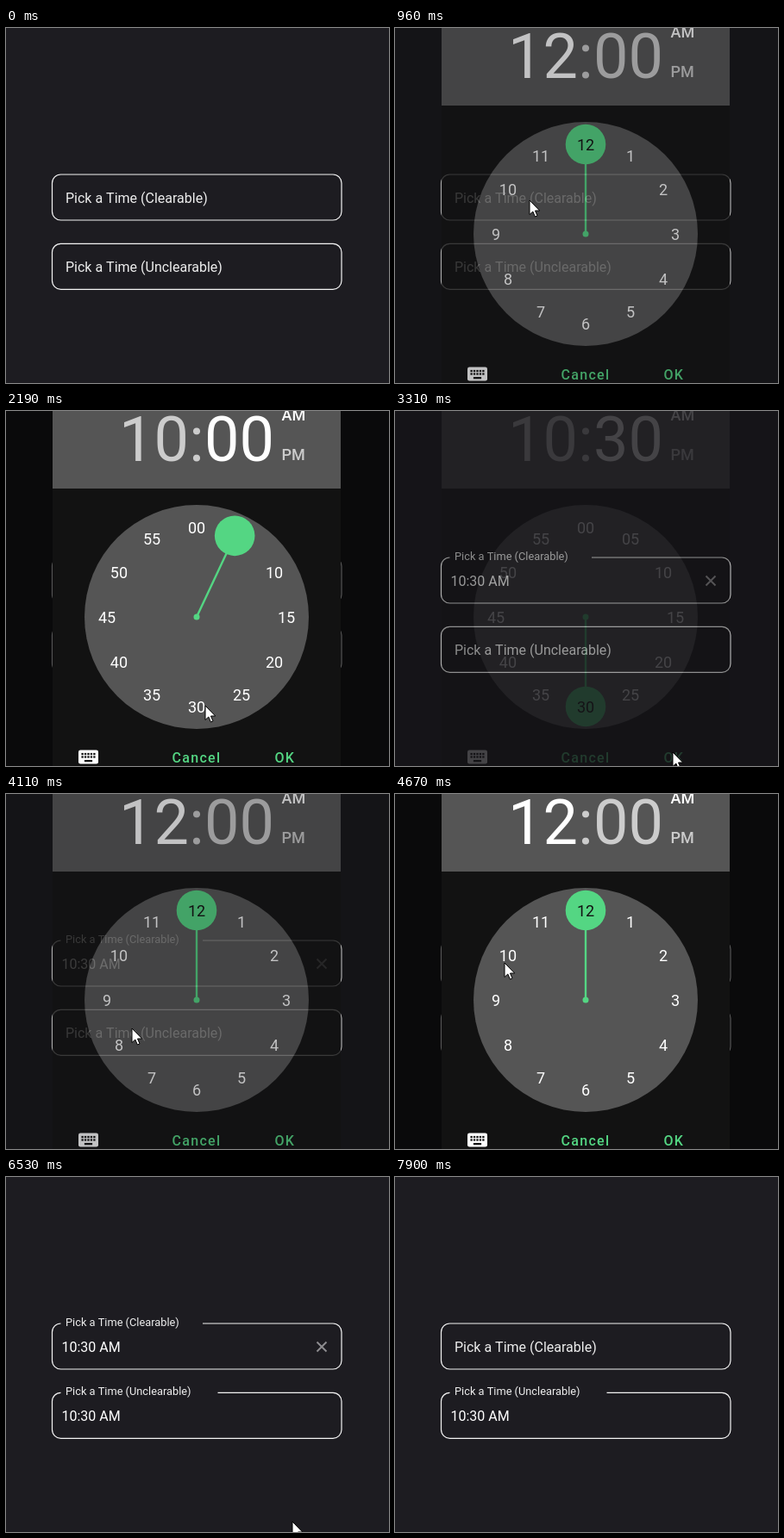
An HTML page with a canvas for the animation above (8430 ms loop, 444x412 px).

```html
<!DOCTYPE html>
<html lang="en">
<head>
<meta charset="utf-8">
<title>Time picker</title>
<style>
html, body { margin: 0; width: 100%; height: 100%; overflow: hidden; background: #1d1c21; }
canvas { display: block; }
</style>
</head>
<body>
<canvas id="stage" width="444" height="412"></canvas>
<script>
const LOOP = 8430, W = 444, H = 412;
const GREEN = '#54d683', GREY = '#555555', BODY = '#121212', DIM = '#cccccc';
const CX = 221, CY = 239, RING = 104;
const FONT = 'Roboto, "Open Sans", sans-serif';

const stage = document.getElementById('stage').getContext('2d');
const sheet = document.createElement('canvas');
sheet.width = W;
sheet.height = H;
const dlg = sheet.getContext('2d');

// Each opening of the dialog; "shift" maps it onto the first one's clock.
const runs = [
  { shift: 0, open: 960, close: 3240 },
  { shift: 3150, open: 4110, close: 6260 }
];
const HOUR_CLICK = 1640, TO_MINUTES = 1780, SWEEP = 500, MINUTE_CLICK = 2400;
const CLEAR = 7560;

// Pointer path: time, x, y
const path = [
  [70, 346, 361], [490, 145, 190], [630, 156, 200], [1300, 156, 200],
  [1540, 127, 196], [1820, 127, 196], [2150, 231, 342], [2500, 231, 342],
  [3010, 322, 396], [3420, 322, 396], [3910, 146, 272], [4290, 146, 272],
  [4660, 127, 196], [4970, 127, 196], [5300, 231, 342], [5600, 231, 342],
  [6050, 322, 396], [6400, 322, 396], [6530, 332, 400], [6740, 346, 330],
  [7230, 366, 198], [7560, 366, 198], [7890, 436, 414]
];

const smooth = p => p * p * (3 - 2 * p);

function text(c, str, x, y, size, color, opt = {}) {
  c.font = `${opt.weight || 400} ${size}px ${FONT}`;
  c.textAlign = opt.align || 'left';
  c.letterSpacing = (opt.spacing || 0) + 'px';
  c.fillStyle = color;
  c.fillText(str, x, y);
  c.letterSpacing = '0px';
}

function disc(c, x, y, r, color) {
  c.fillStyle = color;
  c.beginPath();
  c.arc(x, y, r, 0, Math.PI * 2);
  c.fill();
}

function field(y, label, notchEnd, filled, clearable) {
  const c = stage, l = 53.5, r = 389, b = y + 53, q = 10;
  c.strokeStyle = '#f4f4f4';
  c.lineWidth = 1.2;
  c.beginPath();
  c.moveTo(filled ? notchEnd : l + q, y);
  c.arcTo(r, y, r, b, q);
  c.arcTo(r, b, l, b, q);
  c.arcTo(l, b, l, y, q);
  c.arcTo(l, y, r, y, q);
  if (!filled) c.closePath();
  c.stroke();
  if (!filled) {
    text(c, label, 69, y + 33, 16, '#eeeeee');
    return;
  }
  text(c, label, 69, y + 3, 12.8, '#eeeeee');
  text(c, '10:30 AM', 64.5, y + 33, 16, '#ffffff');
  if (clearable) {
    c.strokeStyle = '#8e8d90';
    c.lineWidth = 1.9;
    c.beginPath();
    for (const s of [-1, 1]) {
      c.moveTo(366 - 5.5, y + 27 - 5.5 * s);
      c.lineTo(366 + 5.5, y + 27 + 5.5 * s);
    }
    c.stroke();
  }
}

function keyboard(c) {
  c.save();
  c.translate(81.7, 387.7);
  c.scale(1.15, 1.15);
  c.fillStyle = '#ffffff';
  c.beginPath();
  c.roundRect(2, 5, 20, 14, 2);
  c.fill();
  c.fillStyle = BODY;
  for (let i = 0; i < 5; i++)
    for (const y of [8, 11]) c.fillRect(5 + 3 * i, y, 2, 2);
  c.fillRect(8, 15, 8, 2);
  c.restore();
}

function numberAt(c, i, minutes, color) {
  const a = i * Math.PI / 6;
  const str = minutes ? String(i * 5).padStart(2, '0') : String(i || 12);
  text(c, str, CX + RING * Math.sin(a), CY - RING * Math.cos(a) + 6.5, 18, color, { align: 'center' });
}

function dialog(u) {
  const c = dlg;
  const minutes = u >= TO_MINUTES;
  const sweeping = minutes && u < TO_MINUTES + SWEEP;
  let angle = 0;
  if (u >= HOUR_CLICK) angle = 300;
  if (minutes) angle = 300 * (1 - smooth(Math.min(1, (u - TO_MINUTES) / SWEEP)));
  if (u >= MINUTE_CLICK) angle = 180;

  c.clearRect(0, 0, W, H);
  c.fillStyle = BODY;
  c.fillRect(54, 0, 334, H);
  c.fillStyle = GREY;
  c.fillRect(54, 0, 334, 90);

  const hour = u < HOUR_CLICK ? '12' : '10';
  const minute = u < MINUTE_CLICK ? '00' : '30';
  text(c, hour, 212, 58, 72, minutes ? DIM : '#ffffff', { align: 'right' });
  text(c, ':', 221, 58, 72, DIM, { align: 'center' });
  text(c, minute, 230, 58, 72, minutes ? '#ffffff' : DIM);
  text(c, 'AM', 319.5, 11, 18, '#ffffff', { weight: 500 });
  text(c, 'PM', 319.5, 57, 18, DIM, { weight: 500 });

  disc(c, CX, CY, 130, GREY);
  for (let i = 0; i < 12; i++) numberAt(c, i, minutes, '#ffffff');

  const a = angle * Math.PI / 180;
  const hx = CX + RING * Math.sin(a), hy = CY - RING * Math.cos(a);
  c.strokeStyle = GREEN;
  c.lineWidth = 2.4;
  c.beginPath();
  c.moveTo(CX, CY);
  c.lineTo(hx, hy);
  c.stroke();
  disc(c, CX, CY, 3.5, GREEN);
  disc(c, hx, hy, 23.3, GREEN);
  if (!sweeping) numberAt(c, Math.round(angle / 30) % 12, minutes, '#121212');

  keyboard(c);
  text(c, 'Cancel', 192.5, 407.5, 16, GREEN, { weight: 500, spacing: 1.3 });
  text(c, 'OK', 311.5, 407.5, 16, GREEN, { weight: 500, spacing: 1.3 });
}

// Returns [dialog opacity, backdrop opacity]
function fade(run, t) {
  if (t < run.open || t >= run.close + 140) return null;
  if (t >= run.close + 70) return [0.2, 0.28];
  if (t >= run.close) return [0.62, 0.48];
  if (t < run.open + 70) return [0.74, 0.3];
  if (t < run.open + 140) return [0.94, 0.54];
  return [1, 0.65];
}

function cursor(t) {
  const n = path.findIndex(k => k[0] > t);
  if (n < 1) return;
  const [t0, x0, y0] = path[n - 1], [t1, x1, y1] = path[n];
  const p = smooth((t - t0) / (t1 - t0));
  const c = stage;
  c.save();
  c.translate(x0 + (x1 - x0) * p, y0 + (y1 - y0) * p);
  c.beginPath();
  c.moveTo(0, 0);
  for (const [x, y] of [[0, 16.5], [3.8, 13], [6.4, 19], [9, 17.8], [6.5, 12], [11.7, 12]]) c.lineTo(x, y);
  c.closePath();
  c.fillStyle = '#ffffff';
  c.fill();
  c.strokeStyle = '#000000';
  c.lineWidth = 1;
  c.stroke();
  c.restore();
}

function draw(t) {
  stage.fillStyle = '#1d1c21';
  stage.fillRect(0, 0, W, H);
  field(170, 'Pick a Time (Clearable)', 228, t >= runs[0].close && t < CLEAR, true);
  field(250.3, 'Pick a Time (Unclearable)', 245.5, t >= runs[1].close, false);

  for (const run of runs) {
    const f = fade(run, t);
    if (!f) continue;
    stage.fillStyle = `rgba(0, 0, 0, ${f[1]})`;
    stage.fillRect(0, 0, W, H);
    dialog(t - run.shift);
    stage.globalAlpha = f[0];
    stage.drawImage(sheet, 0, 0);
    stage.globalAlpha = 1;
  }
  cursor(t);
}

const start = performance.now();
function tick() {
  draw((performance.now() - start) % LOOP);
  requestAnimationFrame(tick);
}
tick();
</script>
</body>
</html>
```
